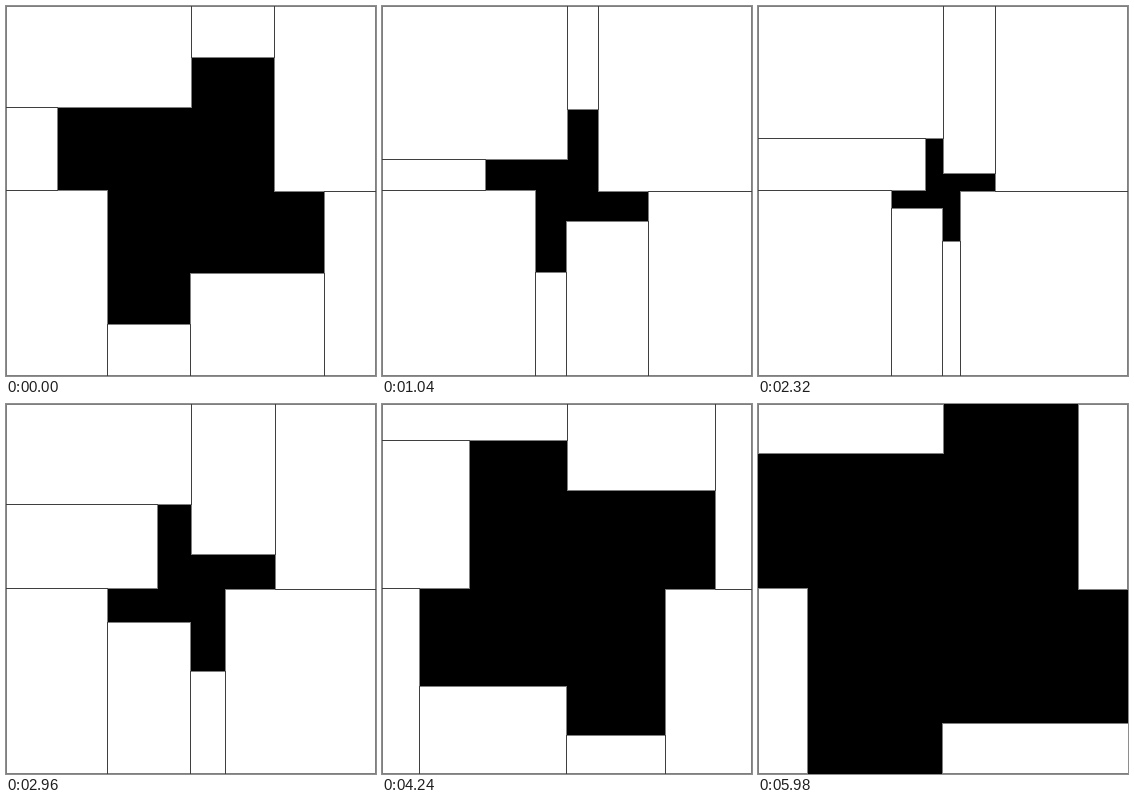
Recreate the animation shown at these times as an HTML page with a canvas. Size 370 px wide and 370 px high, loop 6000 ms.

```html
<!DOCTYPE html>
<html lang="en">
<head>
<meta charset="utf-8">
<title>Pinwheel</title>
<style>
html, body { margin: 0; width: 370px; height: 370px; overflow: hidden; background: #000; }
canvas { display: block; }
</style>
</head>
<body>
<canvas width="370" height="370"></canvas>
<script>
const ctx = document.querySelector('canvas').getContext('2d');
const STEP = 20, LOOP = 6000, END = 369;

// White panels around the black pinwheel, as [left, top, right, bottom].
function panels(w, h) {
  // Inner edges: half pixels go up in x and down in y.
  const a = { x: Math.ceil(185 + w), y: Math.floor(185 - h) };
  const b = { x: Math.ceil(184 + h), y: Math.floor(184 + w) };
  const c = { x: Math.ceil(184 - w), y: Math.floor(184 + h) };
  const d = { x: Math.ceil(185 - h), y: Math.floor(184 - w) };
  return [
    [185, 0, a.x, a.y], [a.x, 0, END, 185],
    [184, b.y, b.x, END], [b.x, 185, END, END],
    [c.x, c.y, 184, END], [0, 184, c.x, END],
    [0, d.y, d.x, 184], [0, 0, 185, d.y]
  ].filter(([l, t, r, bottom]) => r > l && bottom > t);
}

function draw(step) {
  // Both sizes move one pixel per step and bounce at their limits.
  const w = Math.min(Math.abs(step - 73.75) + 9.25, 434 - step);
  const h = Math.abs(step - 123.75) + 10.25;
  const list = panels(w, h);
  ctx.fillStyle = '#000';
  ctx.fillRect(0, 0, 370, 370);
  ctx.fillStyle = '#fff';
  for (const [l, t, r, b] of list) ctx.fillRect(l, t, r - l + 1, b - t + 1);
  // Half-strength outlines: grey alone, dark where two panels meet.
  ctx.strokeStyle = 'rgba(0, 0, 0, 0.5)';
  for (const [l, t, r, b] of list) ctx.strokeRect(l + 0.5, t + 0.5, r - l, b - t);
}

const start = performance.now();
function frame() {
  draw(Math.floor((performance.now() - start) % LOOP / STEP));
  requestAnimationFrame(frame);
}
frame();
</script>
</body>
</html>
```
